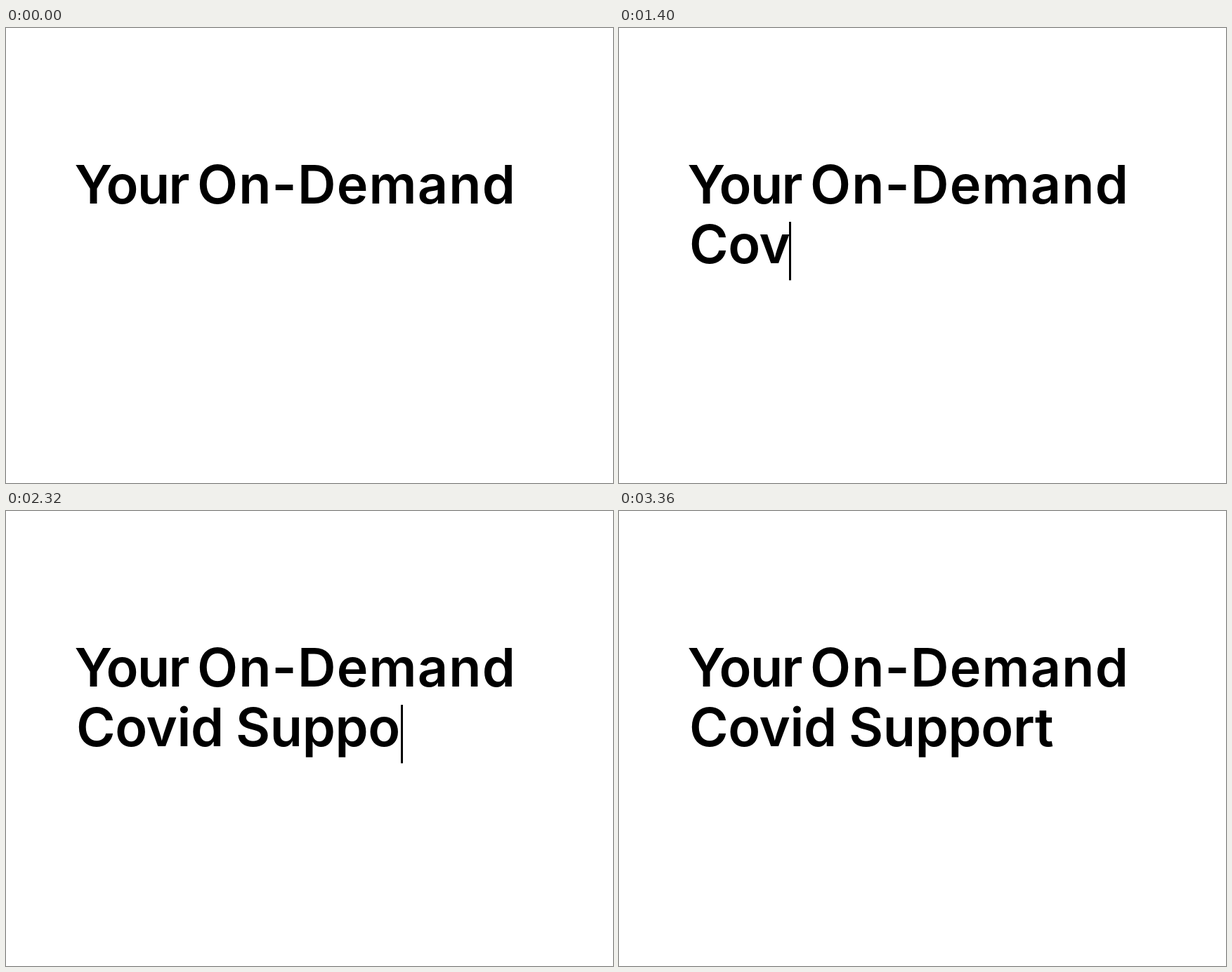
Write an HTML page that moves like this. It is 864 by 648 pixels and loops after 3.88 s.

```html
<!DOCTYPE html>
<html lang="en">
<head>
<meta charset="utf-8">
<title>Your On-Demand Covid Support</title>
<style>
  html, body { margin: 0; width: 100%; height: 100%; overflow: hidden; background: #fff; }
  svg { display: block; width: 864px; height: 648px; }
  text { font: 600 75.5px Inter, "Open Sans", sans-serif; fill: #000; white-space: pre; }
  .tight { letter-spacing: -1.5px; }
  .loose { letter-spacing: 1.2px; }
  .snug { letter-spacing: -0.3px; }
</style>
</head>
<body>
<svg viewBox="0 0 864 648">
  <text class="tight" x="97.5" y="250">Your</text>
  <text class="loose" x="272" y="250">On-Demand</text>
  <text id="first" class="snug" x="100" y="334.5"></text>
  <text id="second" class="snug" x="327" y="334.5"></text>
  <rect id="caret" y="276" width="3" height="83.3" opacity="0"/>
</svg>
<script>
  const LOOP = 3880, TICK = 40, FADE = 600;
  const FADE_IN = 480, FADE_OUT = 2760;
  const WORDS = ["Covid", "Support"];

  // One entry per keystroke: [time in ms, caret x after it]
  const KEYS = [
    [1160, 158], [1240, 202], [1400, 242], [1440, 262], [1600, 310.5],
    [1680, 327], [1760, 373], [1880, 418.5], [2120, 467], [2200, 515.5],
    [2320, 562], [2600, 594], [2720, 622]
  ];

  const first = document.getElementById("first");
  const second = document.getElementById("second");
  const caret = document.getElementById("caret");

  const fade = (time, start) => {
    const p = Math.min(1, Math.max(0, (time - start) / FADE));
    return 1 - (1 - p) ** 2.6;
  };

  function draw(time) {
    const typed = KEYS.filter(([at]) => at <= time).length;
    const [word, next] = WORDS;
    first.textContent = word.slice(0, typed);
    second.textContent = next.slice(0, Math.max(0, typed - word.length - 1));
    caret.setAttribute("x", typed ? KEYS[typed - 1][1] : 98.5);
    caret.setAttribute("opacity", fade(time, FADE_IN) - fade(time, FADE_OUT));
  }

  const origin = performance.now();
  function loop() {
    const time = (performance.now() - origin) % LOOP;
    draw(Math.floor(time / TICK) * TICK);
    requestAnimationFrame(loop);
  }
  loop();
</script>
</body>
</html>
```
